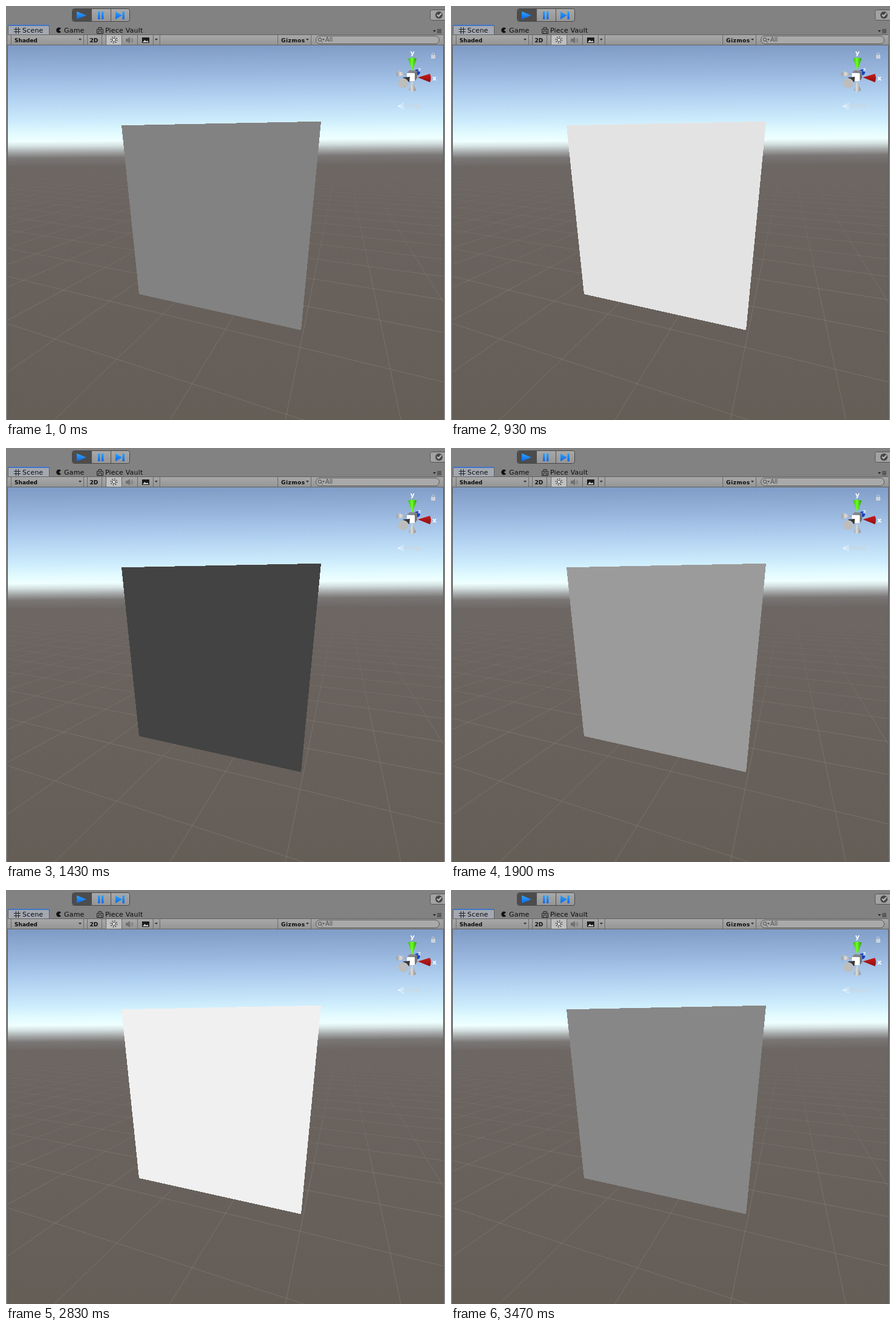
Animation of 726x684 px, one loop 3.56 s. Source, as an HTML page:

```html
<!DOCTYPE html>
<html lang="en">
<head>
<meta charset="utf-8">
<title>Scene view</title>
<style>
  html, body { margin: 0; width: 100%; height: 100%; overflow: hidden; background: #828282; }
  svg { display: block; width: 726px; height: 684px; }
  text { font: 11px "DejaVu Sans", Verdana, sans-serif; fill: #0c0c0c; }
  .tab { letter-spacing: .2px; }
  .small { font-size: 9px; font-weight: bold; }
  .axis { font-size: 11px; font-weight: bold; fill: #fff; }
  .crisp { shape-rendering: crispEdges; }
</style>
</head>
<body>
<svg viewBox="0 0 726 684">
  <defs>
    <linearGradient id="sky" gradientUnits="userSpaceOnUse" x1="362" y1="65" x2="363.6" y2="265">
      <stop offset="0" stop-color="#7f9cc6"/>
      <stop offset=".2" stop-color="#95b3db"/>
      <stop offset=".42" stop-color="#b1d1f1"/>
      <stop offset=".62" stop-color="#cdecfc"/>
      <stop offset=".72" stop-color="#e3fbff"/>
      <stop offset=".78" stop-color="#efffff"/>
      <stop offset=".82" stop-color="#d6e2e2"/>
      <stop offset=".87" stop-color="#a5a8a8"/>
      <stop offset=".92" stop-color="#797675"/>
      <stop offset="1" stop-color="#6d6764"/>
    </linearGradient>
    <linearGradient id="ground" x2="0" y2="1">
      <stop offset="0" stop-color="#6d6764"/>
      <stop offset=".3" stop-color="#69625d"/>
      <stop offset="1" stop-color="#655e57"/>
    </linearGradient>
    <linearGradient id="fade" gradientUnits="userSpaceOnUse" x1="0" y1="255" x2="0" y2="480">
      <stop offset="0" stop-color="#fff" stop-opacity="0"/>
      <stop offset=".3" stop-color="#fff" stop-opacity=".35"/>
      <stop offset="1" stop-color="#fff"/>
    </linearGradient>
    <linearGradient id="bar" x2="0" y2="1">
      <stop offset="0" stop-color="#a9a9a9"/>
      <stop offset="1" stop-color="#959595"/>
    </linearGradient>
    <linearGradient id="blue" x2="0" y2="1">
      <stop offset="0" stop-color="#2fa5ff"/>
      <stop offset="1" stop-color="#0a66e8"/>
    </linearGradient>
    <linearGradient id="metal">
      <stop offset="0" stop-color="#999"/>
      <stop offset=".4" stop-color="#ddd"/>
      <stop offset="1" stop-color="#888"/>
    </linearGradient>
    <linearGradient id="green">
      <stop offset="0" stop-color="#39b80d"/>
      <stop offset=".45" stop-color="#6cff25"/>
      <stop offset="1" stop-color="#2f960d"/>
    </linearGradient>
    <linearGradient id="red" x2="0" y2="1">
      <stop offset="0" stop-color="#c81d1d"/>
      <stop offset="1" stop-color="#8e0e0e"/>
    </linearGradient>
    <mask id="far" maskUnits="userSpaceOnUse" x="0" y="0" width="726" height="684">
      <rect x="3" y="255" width="720" height="429" fill="url(#fade)"/>
    </mask>
  </defs>

  <rect width="726" height="684" fill="#828282"/>

  <!-- viewport -->
  <rect x="2" y="64" width="722" height="620" fill="#555"/>
  <rect x="3" y="65" width="720" height="200" fill="url(#sky)"/>
  <rect x="3" y="264" width="720" height="420" fill="url(#ground)"/>
  <g mask="url(#far)"><path id="grid" fill="none" stroke="#99978f" stroke-opacity=".36"/></g>
  <path id="quad" class="crisp" d="M191 197.250L521 190.750 488 535.500 220 476Z" fill="#838383"/>

  <!-- playback buttons -->
  <rect x="109.5" y="4.5" width="95" height="21" rx="3" fill="url(#bar)" stroke="#484848"/>
  <path d="M141 5H112.500Q110 5 110 8V22Q110 25 112.500 25H141Z" fill="#4c4c4c"/>
  <path d="M141.500 5V25M173.500 5V25" stroke="#505050"/>
  <g fill="url(#blue)">
    <path d="M117 9L133 15.500 117 22Z"/>
    <path d="M152 9H155.500V22H152ZM158 9H161.500V22H158Z"/>
    <path d="M181 9L192 15.500 181 22ZM192.500 9H196V22H192.500Z"/>
  </g>
  <rect x="701.5" y="6.500" width="32" height="17" rx="3" fill="#a2a2a2" stroke="#555"/>
  <circle cx="716" cy="15" r="6" fill="#484848"/>
  <path d="M713 14.500L715.500 17 720 12" fill="none" stroke="#c0c0c0" stroke-width="2"/>

  <!-- tabs -->
  <path d="M4 48V32H71V48" fill="#a3a8b1"/>
  <path d="M3.500 48V32M71.500 48V32" stroke="#5e5e5e"/>
  <path d="M4 32H71" stroke="#3f74c8" stroke-width="2"/>
  <path d="M16.500 35V46M20.500 35V46M13 38.500H24M13 42.500H24" stroke="#222"/>
  <text class="tab" x="27" y="44">Scene</text>
  <path d="M91 37A4.500 4.500 0 1 0 91 43L87.500 40Z" fill="#111"/>
  <text class="tab" x="96" y="44">Game</text>
  <path d="M150.500 38.500H160.500V45.500H150.500ZM153 38V35.500H158V38M153 45V41H158V45" fill="none" stroke="#222"/>
  <text class="tab" x="164" y="44">Piece Vault</text>
  <path d="M706 40H711L708.500 43ZM713 38.500H720V39.500H713ZM713 41H720V42H713ZM713 43.500H720V44.500H713Z" fill="#222"/>

  <!-- view toolbar -->
  <rect x="3" y="47" width="720" height="17" fill="url(#bar)"/>
  <path d="M3 47.500H723M3 64.500H723" stroke="#606060"/>
  <rect x="166" y="48" width="25" height="16" fill="#c0c0c0"/>
  <path d="M8.500 48V64M128.500 48V64M134.500 48V64M158.500 48V64M165.500 48V64M191.500 48V64M217.500 48V64M243.500 48V64M254.500 48V64M449.500 48V64M504.500 48V64" stroke="#6a6a6a"/>
  <path d="M120 54H125L122.500 57ZM246 54H251L248.500 57ZM496 54H501L498.500 57Z" fill="#333"/>
  <text class="small" x="14" y="60">Shaded</text>
  <text class="small" x="138.500" y="60">2D</text>
  <text class="small" x="455" y="60" style="letter-spacing:.5px">Gizmos</text>
  <circle cx="178.500" cy="56" r="2.500" fill="#fff" stroke="#222"/>
  <circle cx="178.500" cy="56" r="5" fill="none" stroke="#222" stroke-width="1.500" stroke-dasharray="1.400 2.527"/>
  <path d="M198 54H201L205 51V62L201 59H198Z" fill="#707070"/>
  <path d="M206.500 54Q208 56.500 206.500 59M208.500 52.500Q211 56.500 208.500 60.500" fill="none" stroke="#707070"/>
  <rect x="225" y="52" width="12" height="9" fill="#1b1b1b"/>
  <path d="M226 60L229.500 56 232 58.500 234 57 236 60Z" fill="#ccc"/>
  <rect x="512.500" y="49.500" width="204" height="13" rx="6.500" fill="#a9a9a9" stroke="#575757"/>
  <circle cx="519" cy="55.500" r="2.700" fill="none" stroke="#444"/>
  <path d="M521 57.500L523.500 60.500" stroke="#444"/>
  <path d="M523 54.500H527L525 57Z" fill="#444"/>
  <text x="528" y="59" style="font-size:10px;fill:#4c4c4c">All</text>

  <!-- orientation gizmo -->
  <circle cx="680" cy="109.500" r="4.800" fill="#1442c8"/>
  <path d="M663 113L648 107Q644.500 111 646.500 117Z" fill="url(#metal)"/>
  <path d="M672 123L666 139Q672 145 678 139Z" fill="url(#metal)"/>
  <path d="M663 110L668 106 680 107 676 111Z" fill="#858585"/>
  <path d="M676 111L680 107V119L676 124Z" fill="#777"/>
  <rect x="663" y="111" width="13" height="13" fill="#fff"/>
  <path d="M656 118L668 117 667 126Z" fill="#383838"/>
  <ellipse cx="657" cy="127.500" rx="8.500" ry="8" fill="#bdbdbd"/>
  <path d="M672 107L665 87Q672 83.500 679 87Z" fill="url(#green)"/>
  <path d="M681 118L701 112Q704.500 119 701 126Z" fill="url(#red)"/>
  <text class="axis" x="668.500" y="81">y</text>
  <text class="axis" x="705" y="123">x</text>
  <text class="axis" x="681" y="108" style="font-size:9px;opacity:.8">z</text>
  <rect x="703" y="81" width="7" height="6" fill="#ccd3dc"/>
  <path d="M704.500 81V79Q706.500 75.500 708.500 79V81" fill="none" stroke="#ccd3dc"/>
  <path d="M658 161L648 165.500 658 170M648 165.500H658" fill="none" stroke="#fff" stroke-opacity=".8"/>
  <text x="660" y="169" style="font-size:10px;fill:#d8d0c6;opacity:.7">Persp</text>
</svg>
<script>
  const LOOP = 3560;
  const RAMP = 1718;   // ms for black to white, then straight back to black
  const OFFSET = 385;  // ms already into the ramp when the loop starts

  // Moments (ms) at which the picture is refreshed; it holds in between.
  const ticks = [
    0, 100, 230, 370, 570, 730, 930, 1200, 1370, 1430, 1530, 1570, 1630, 1700,
    1770, 1900, 2030, 2200, 2400, 2600, 2830, 3070, 3130, 3170, 3230, 3270,
    3330, 3400, 3470
  ];

  // Linear light (0 to 1) to an sRGB grey level.
  function toGrey(light) {
    const s = light <= 0.0031308 ? 12.92 * light : 1.055 * light ** (1 / 2.4) - 0.055;
    return Math.round(255 * s);
  }

  // Ground grid: two families of lines, each meeting at a point on the horizon.
  function gridPath() {
    const horizon = 220, rightX = 556, leftX = -935;
    let d = "";
    for (let k = -16; k <= 16; k++) {
      d += `M${rightX} ${horizon}L${80 + 191 * k} 684`;
    }
    for (let k = -1; k < 22; k++) {
      const slope = 1 / (0.003279 + 0.001127 * k) / (3 - leftX);
      d += `M${leftX} ${horizon}L726 ${(horizon + slope * (726 - leftX)).toFixed(1)}`;
    }
    return d;
  }

  document.getElementById("grid").setAttribute("d", gridPath());
  const quad = document.getElementById("quad");
  const start = performance.now();

  function draw(now) {
    const t = Math.max(0, now - start) % LOOP;
    const tick = ticks.findLast(from => from <= t);
    const v = toGrey((tick + OFFSET) % RAMP / RAMP);
    quad.setAttribute("fill", `rgb(${v},${v},${v})`);
    requestAnimationFrame(draw);
  }
  draw(start);
</script>
</body>
</html>
```
